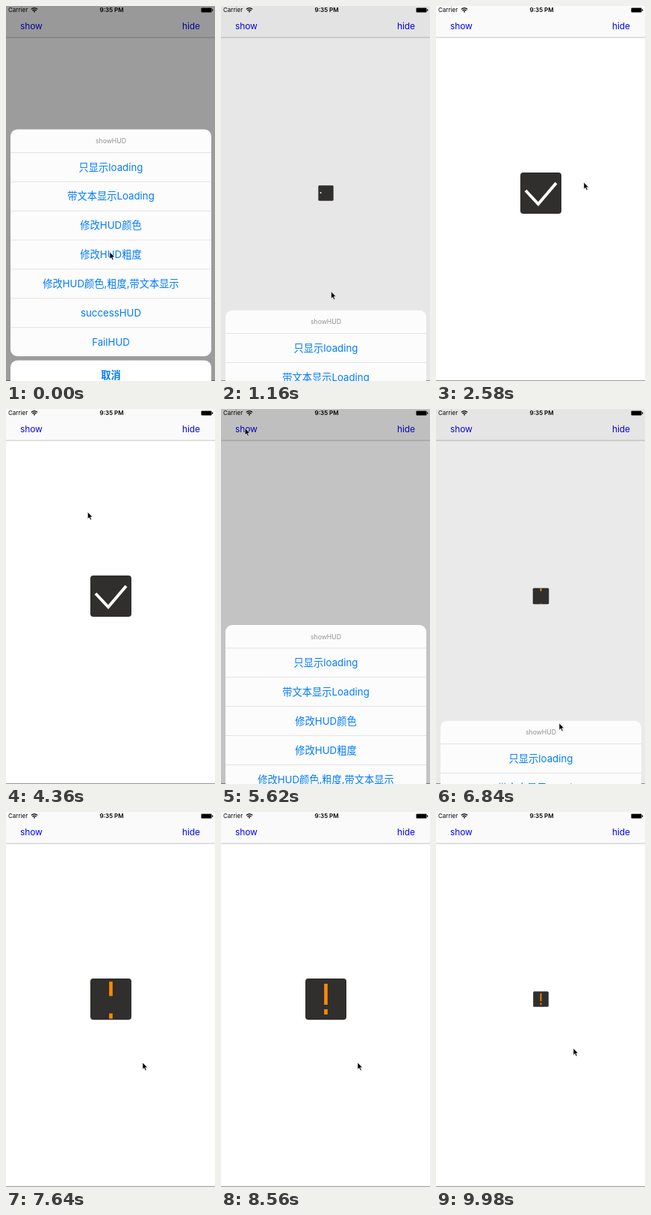
Animation, 280 px wide and 500 px high, one loop 10 s. Source, as an HTML page:

```html
<!DOCTYPE html>
<html lang="zh-CN">
<head>
<meta charset="utf-8">
<style>
html, body { margin: 0; width: 100%; height: 100%; overflow: hidden; background: #fff; }
svg { display: block; font-family: Inter, "Noto Sans CJK SC", "Noto Sans CJK", sans-serif; }
.nav { font-size: 12px; letter-spacing: -.1px; fill: #0808ee; }
.row { font-size: 13.25px; fill: #007aff; text-anchor: middle; }
.title { font-size: 8.7px; fill: #929292; text-anchor: middle; }
.status { font-size: 8px; }
</style>
</head>
<body>
<svg width="280" height="500" viewBox="0 0 280 500">
  <rect width="280" height="500" fill="#fff"/>
  <rect width="280" height="42" fill="#fafafa"/>
  <rect y="41.5" width="280" height="1" fill="#c4c4c4"/>
  <g class="status">
    <text x="3" y="8.3">Carrier</text>
    <text x="141.5" y="8.3" text-anchor="middle" font-weight="600">9:35 PM</text>
    <g fill="none" stroke="#000" stroke-width="1.2">
      <path d="M33.8 4.4Q38 .8 42.2 4.4M35.4 6.2Q38 3.9 40.6 6.2"/>
      <circle cx="38" cy="7.6" r=".4"/>
    </g>
    <rect x="261.5" y="2.5" width="14" height="6" rx="1"/>
    <rect x="276" y="4.3" width="1.3" height="2.4" rx=".6"/>
  </g>
  <g class="nav">
    <text x="19" y="31.3">show</text>
    <text x="260" y="31.3" text-anchor="end">hide</text>
  </g>
  <rect y="499" width="280" height="1" fill="#999"/>
  <rect id="dim" width="280" height="500"/>
  <g id="sheet">
    <rect x="6" y="164.5" width="269" height="302.5" rx="9" fill="#fcfcfc"/>
    <rect x="6" y="472.5" width="269" height="39" rx="9" fill="#fff"/>
    <text class="title" x="140.5" y="183">showHUD</text>
    <g id="rows"></g>
    <text class="row" x="140.5" y="496.5" font-weight="600">取消</text>
  </g>
  <g id="hud">
    <rect x="-27.5" y="-27.5" width="55" height="55" rx="4" fill="#302f2d"/>
    <path id="check" d="M-20.5-3.5L-3.5 14.5L20.5-13.5" pathLength="1" fill="none" stroke="#fff" stroke-width="4"/>
    <g id="bang" fill="#ff8a00">
      <rect id="bar" x="-2.3" width="4.6"/>
      <rect id="dot" x="-2.3" width="4.6"/>
    </g>
  </g>
  <path id="cursor" d="M0 0V9.2L2.1 7.3L3.6 10.7L5.2 10L3.7 6.7H6.5Z" stroke="#fff" stroke-width=".6"/>
</svg>
<script>
const LOOP = 10000;
const $ = id => document.getElementById(id);
const clamp = v => Math.min(1, Math.max(0, v));
const smooth = v => v * v * (3 - 2 * v);
const progress = (t, start, length) => clamp((t - start) / length);
const set = (id, attrs) => {
  for (const key in attrs) $(id).setAttribute(key, attrs[key]);
};

// Critically damped settling, as used by the action sheet
const settle = (t, start) => {
  const x = Math.max(0, t - start) * .019;
  return 1 - Math.exp(-x) * (1 + x);
};

const labels = ['只显示loading', '带文本显示Loading', '修改HUD颜色', '修改HUD粗度',
  '修改HUD颜色,粗度,带文本显示', 'successHUD', 'FailHUD'];
$('rows').innerHTML = labels.map((label, i) => {
  const y = 195 + i * 38.9;
  return `<rect x="6" y="${y}" width="269" height=".7" fill="#d9d9d9"/>
    <text class="row" x="140.5" y="${y + 24.5}">${label}</text>`;
}).join('');

// Pointer stops: time, x, y
const stops = [
  [0, 139, 328], [650, 148, 408], [1020, 148, 408], [1160, 147.5, 381],
  [2000, 198, 235], [3500, 198, 235], [4140, 110, 140], [4360, 109.5, 137.5],
  [5080, 32, 26], [5620, 32, 25], [6400, 165, 447], [6690, 165, 447],
  [6840, 165, 419], [7560, 183, 334], [9600, 183, 334], [9980, 184, 315], [LOOP, 184, 315]
];

function pointer(t) {
  const i = Math.max(1, stops.findIndex(s => s[0] > t));
  const [t0, x0, y0] = stops[i - 1], [t1, x1, y1] = stops[i];
  const p = progress(t, t0, t1 - t0);
  return `translate(${x0 + (x1 - x0) * p} ${y0 + (y1 - y0) * p})`;
}

function sheetAmount(t) {
  if (t < 5508) return 1 - settle(t, 1028);
  return t < 6700 ? settle(t, 5508) : 1 - settle(t, 6700);
}

function drawHud(t) {
  const failed = t >= 6700;
  const [show, hide] = failed ? [6700, 9800] : [1025, 4400];
  const scale = smooth(progress(t, show, 330)) * (1 - smooth(progress(t, hide, 310)));
  set('hud', {
    transform: `translate(140.5 249.5) scale(${scale})`,
    visibility: scale > .002 ? 'visible' : 'hidden'
  });
  $('check').style.display = failed ? 'none' : '';
  $('bang').style.display = failed ? '' : 'none';

  const drawn = progress(t, show, 1500);
  set('check', { 'stroke-dasharray': `${drawn} 2` });

  // The bar enters from the top edge, the dot from below
  const p = smooth(progress(t, show, 1800));
  set('bar', { y: -26.5 + 6 * p, height: 9 + 19 * p });
  set('dot', { y: 25.5 - 12 * p, height: 2 + 5 * Math.min(1, p * 2) });
}

function draw(now) {
  const t = now % LOOP;
  const open = sheetAmount(t);
  set('dim', { opacity: .39 * open ** 1.12 });
  set('sheet', { transform: `translate(0 ${336 * (1 - open)})` });
  drawHud(t);
  set('cursor', { transform: pointer(t) });
}

const begin = performance.now();
function tick() {
  draw(performance.now() - begin);
  requestAnimationFrame(tick);
}
tick();
</script>
</body>
</html>
```
